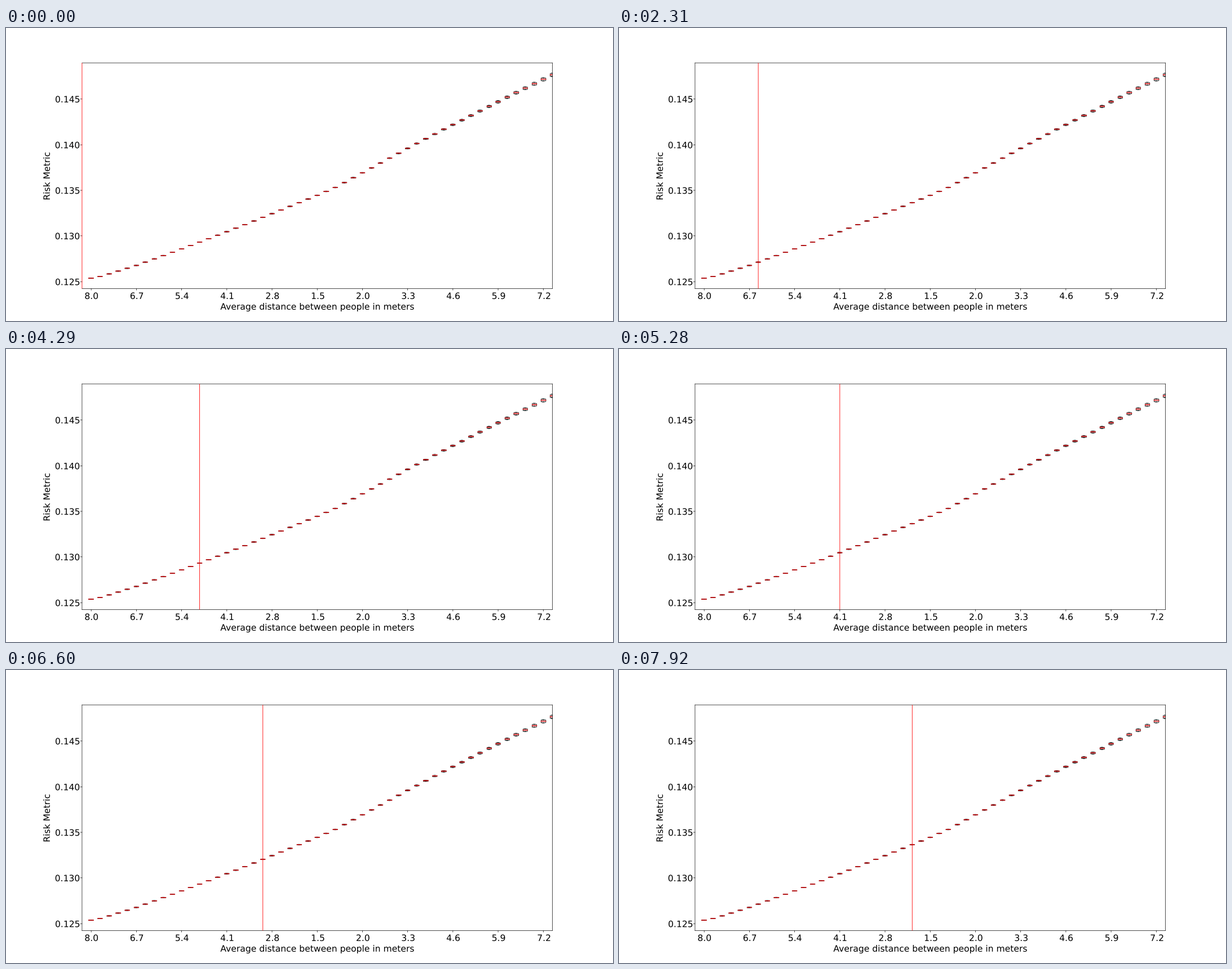
Write a matplotlib script that moves like this. It is 1077 px wide and 520 px high and loops after 8000 ms.

```python
import numpy as np
import matplotlib.pyplot as plt
from matplotlib.animation import FuncAnimation
from matplotlib.collections import LineCollection
from matplotlib.patches import PathPatch, Rectangle
from matplotlib.textpath import TextPath
from matplotlib.transforms import Affine2D

W, H = 1077, 520
DPI = 64
PX = 72 / DPI            # one pixel in points
GRID = W / 1920          # cell of the grid that lines sit on, in pixels
UNIT = GRID * 100 / 72   # one typographic point of the plot in pixels
FONT = 20 * UNIT

LOOP, TICK, HOLD = 8000, 20, 330

LEFT, RIGHT = 0.125 * W, 0.9 * W
TOP, BOTTOM = 0.12 * H, 0.89 * H
COUNT = 52
STEP = (RIGHT - LEFT) / COUNT

plt.rcParams["font.family"] = "DejaVu Sans"

fig = plt.figure(figsize=(W / DPI, H / DPI), dpi=DPI, facecolor="white")
ax = fig.add_axes([0, 0, 1, 1])
ax.set_xlim(0, W)
ax.set_ylim(H, 0)
ax.axis("off")


def snap_x(x):
    return (np.floor(x / GRID + 0.5) + 0.5) * GRID


def snap_y(y):
    return H - snap_x(H - y)


def x_at(i):
    return LEFT + i * STEP


def y_at(value):
    return 450.3 - (value - 0.125) * 16200


def strokes(segments, width, color, zorder, clip=None):
    lines = LineCollection(segments, linewidths=width * UNIT * PX, colors=color,
                           capstyle="projecting", zorder=zorder)
    lines.set_snap(False)
    ax.add_collection(lines, autolim=False)
    if clip is not None:
        lines.set_clip_path(clip)
    return lines


def label(x, baseline, text, align=0.5, angle=0):
    """Place outlined text; align is the share of its width left of x."""
    path = TextPath((0, 0), text, size=FONT)
    place = (Affine2D().translate(-align * path.get_extents().width, 0)
             .scale(1, -1).rotate_deg(-angle).translate(x, baseline))
    ax.add_patch(PathPatch(path, facecolor="black", linewidth=0, snap=False,
                           transform=place + ax.transData))


# Frame and ticks
x0, x1 = snap_x(LEFT), snap_x(RIGHT)
y0, y1 = snap_y(TOP), snap_y(BOTTOM)
tick_len = 3.5 * UNIT
frame = [[(x0, y0), (x1, y0)], [(x1, y0), (x1, y1)], [(x1, y1), (x0, y1)]]
ticks = []

for k in range(11):
    i = 1 + 5 * k
    distance = 8.0 - 1.3 * k if k < 6 else 2.0 + 1.3 * (k - 6)
    x = snap_x(x_at(i))
    ticks.append([(x, y1), (x, y1 + tick_len)])
    label(x_at(i), 480.9, f"{distance:.1f}")

for k in range(5):
    value = 0.125 + 0.005 * k
    y = snap_y(y_at(value))
    ticks.append([(x0, y), (x0 - tick_len, y)])
    label(LEFT - 2 * tick_len, y + 6.1, f"{value:.3f}", align=1)

strokes(frame + ticks, 0.9, "black", 4)
left_edge = strokes([[(x0, y0), (x0, y1)]], 0.9, "black", 4)
label((LEFT + RIGHT) / 2, 499.8, "Average distance between people in meters")
label(77.8, (TOP + BOTTOM) / 2 + 1.5, "Risk Metric", angle=90)

# Box plots along the rising curve
knots = [(1, 444), (2, 441), (3, 436.4), (6, 421.4), (10, 398), (14, 374),
         (18, 349), (22, 323), (26, 297), (28, 283), (31, 257), (37, 204.8),
         (40, 179.5), (44, 147), (48, 114.5), (52, 83)]
index = np.arange(1, COUNT + 1)
median = np.interp(index, *zip(*knots))
upper = np.interp(index, [1, 40, 52], [0.5, 0.6, 2.2])
lower = np.interp(index, [1, 33, 52], [0.5, 0.6, 2.6])
whisker = np.interp(index, [1, 33, 52], [0.0, 0.2, 0.7])

outline, middle = [], []
for i, m, up, low, reach in zip(index, median, upper, lower, whisker):
    x = x_at(i)
    a, b = snap_x(x - STEP / 4), snap_x(x + STEP / 4)
    top, bottom = m - up, m + low
    outline.append([(a, bottom), (b, bottom), (b, top), (a, top), (a, bottom)])
    for edge, end in ((top, top - reach), (bottom, bottom + reach)):
        outline.append([(x, edge), (x, end)])
        outline.append([(x - STEP / 8, end), (x + STEP / 8, end)])
    middle.append([(a, m), (b, m)])

area = Rectangle((x0, y0), x1 - x0, y1 - y0, transform=ax.transData)
strokes(outline, 1, "black", 2, area)
strokes(middle, 2, "#e0191c", 3, area)

# Sweeping marker
marker, = ax.plot([x0, x0], [y0, y1], color="red", lw=1.1 * UNIT * PX,
                  solid_capstyle="butt", zorder=5, snap=False)


def update(n):
    step = (n * TICK + TICK // 2) // HOLD
    x = snap_x(x_at(step))
    marker.set_xdata([x, x])
    left_edge.set_visible(step > 0)  # the marker starts on top of this edge
    return marker, left_edge


anim = FuncAnimation(fig, update, frames=LOOP // TICK, interval=TICK,
                     repeat=True, repeat_delay=0, blit=False)
plt.show()
```
